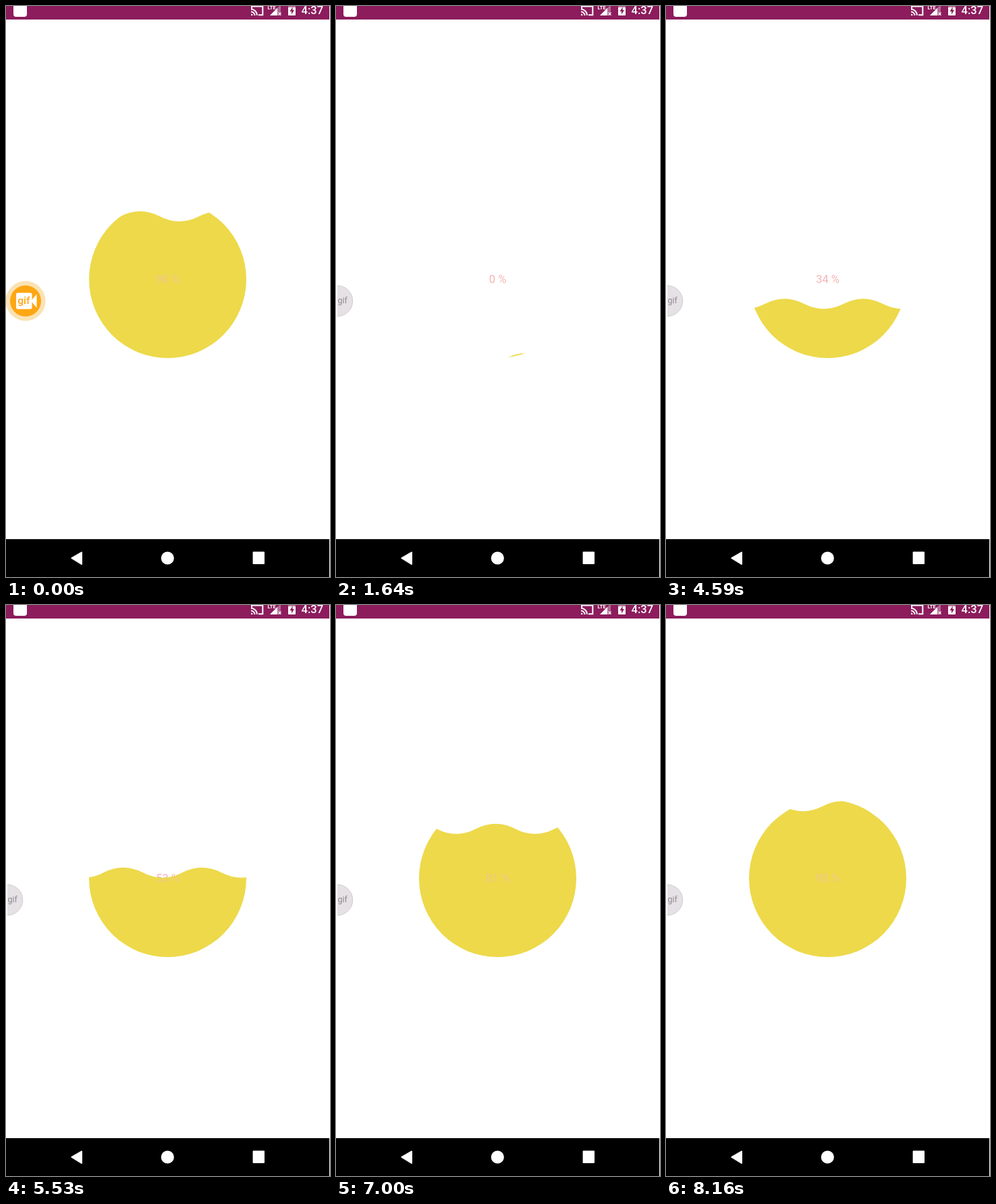
Animation of 480 by 845 pixels, one loop 8.26 s. Source, as an HTML page:

```html
<!DOCTYPE html>
<html lang="en">
<head>
<meta charset="utf-8">
<title>Wave progress</title>
<style>
  html, body { margin: 0; width: 100%; height: 100%; overflow: hidden; background: #fff; }
  svg { display: block; width: 100vw; height: 100vh; }
  text { font-family: Roboto, "Open Sans", sans-serif; }
  .pct { font-size: 16.5px; text-anchor: middle; }
</style>
</head>
<body>
<svg viewBox="0 0 480 845" preserveAspectRatio="none">
  <defs>
    <clipPath id="disk"><circle cx="239.5" cy="404.5" r="116.5"/></clipPath>
    <clipPath id="water"><path class="wave"/></clipPath>
    <clipPath id="edge"><rect x="2" y="400" width="60" height="80"/></clipPath>
  </defs>
  <rect width="480" height="845" fill="#fff"/>

  <!-- status bar -->
  <rect width="479" height="20" fill="#8c1c5c"/>
  <rect x="11" y="-6" width="20" height="22" rx="4" fill="#fff"/>
  <g fill="none" stroke="#fff" stroke-width="2">
    <path d="M364 4V0.5H380.3V13.2H374"/>
    <path d="M363 8.5a5.500 5.500 0 0 1 5.500 5.500M363 4.800a9 9 0 0 1 9 9"/>
  </g>
  <path d="M363 11.400a2.600 2.600 0 0 1 2.600 2.600H363z" fill="#fff"/>
  <path d="M391 14L407 -2V14z" fill="#fff" opacity=".35"/>
  <path d="M391 14L402 3V14z" fill="#fff"/>
  <path d="M403.600 9.600l4 4m0-4l-4 4" stroke="#fff" stroke-width="1.2"/>
  <text x="387.500" y="5" font-size="7.5" font-weight="700" fill="#fff">LTE</text>
  <rect x="418" y="-2" width="11" height="16" rx="1" fill="#fff" opacity=".4"/>
  <rect x="418" y="2" width="11" height="12" rx="1" fill="#fff"/>
  <path d="M424.600 1.500L420.500 8H423V12.500L427 6H424.600z" fill="#8c1c5c"/>
  <text x="437.500" y="12.300" font-size="16.5" font-weight="500" fill="#fff">4:37</text>

  <!-- progress -->
  <text class="pct" x="239.5" y="410" fill="#f5b3b5"></text>
  <g clip-path="url(#disk)"><path class="wave" fill="#edd94a"/></g>
  <g clip-path="url(#water)"><text class="pct" x="239.5" y="410" fill="#f2c68e"></text></g>

  <!-- floating recorder button -->
  <g id="full">
    <circle cx="29" cy="436.5" r="29.5" fill="#fbe2b4"/>
    <circle cx="29" cy="436.5" r="23" fill="#fea613"/>
    <rect x="15" y="424.5" width="23.5" height="24" rx="2.5" fill="#fff"/>
    <path d="M37.500 436.500L45 427.500V445.500z" fill="#fff" stroke="#fff" stroke-linejoin="round"/>
    <text x="17.3" y="441" font-size="15.5" font-weight="500" fill="#fea613">gif</text>
  </g>
  <g id="half" clip-path="url(#edge)">
    <circle id="halo" cx="2" cy="436.5" r="29.5" fill="#fbe2b4"/>
    <circle id="knob" cx="2" cy="436.5" r="22.7"/>
    <text id="tag" x="2.5" y="440" font-size="12.5">gif</text>
  </g>

  <!-- navigation bar -->
  <rect y="789" width="479" height="56" fill="#000"/>
  <g fill="#fff" stroke="#fff" stroke-width="2" stroke-linejoin="round">
    <path d="M97.300 817L112 808.500V826z"/>
    <circle cx="239.3" cy="817" r="8.6"/>
    <rect x="366.6" y="808.6" width="15.4" height="16.4"/>
  </g>
</svg>
<script>
const LOOP = 8260;                  // ms
const FILL = 7600, RESTART = 1555;  // one filling, and when it begins anew
const BOTTOM = 521, SIZE = 233;     // the disk
const WAVE = 116.5, SWELL = 15;     // wave length and curve handle
const CREST = 198.5, DRIFT = 0.1219; // first crest, px per ms
const DOCKING = 90, DOCKED = 150, IDLE = 830;

const all = q => document.querySelectorAll(q);
const byId = id => document.getElementById(id);
const waves = all('.wave'), labels = all('.pct');
const full = byId('full'), half = byId('half'), halo = byId('halo');
const knob = byId('knob'), tag = byId('tag');
const show = (el, on) => { el.style.display = on ? '' : 'none'; };

// share filled, easing in and out
function filled(t) {
  const phase = (t - RESTART + FILL) % FILL / FILL;
  return (1 - Math.cos(Math.PI * phase)) / 2;
}

function wavePath(crest, y) {
  const h = WAVE / 2;
  const x = crest % WAVE - h / 2 - WAVE;
  return `M${x} ${y}` +
    `q${h / 2} ${-SWELL} ${h} 0q${h / 2} ${SWELL} ${h} 0`.repeat(6) +
    `V540H${x}z`;
}

function drawButton(t) {
  const docked = t >= DOCKED, idle = t >= IDLE;
  show(full, !docked);
  show(half, docked);
  show(halo, !idle);
  full.setAttribute('transform', `translate(${t < DOCKING ? 0 : -13})`);
  knob.setAttribute('fill', idle ? '#e5e1e5' : '#fea613');
  knob.setAttribute('stroke', idle ? '#cfcbd1' : 'none');
  tag.setAttribute('fill', idle ? '#8f8c90' : '#fff');
}

function draw(t) {
  const part = filled(t);
  const d = wavePath(CREST + DRIFT * t, BOTTOM - SIZE * part);
  waves.forEach(w => w.setAttribute('d', d));
  labels.forEach(l => { l.textContent = Math.floor(part * 100) + ' %'; });
  drawButton(t);
}

const start = performance.now();
function frame() {
  draw((performance.now() - start) % LOOP);
  requestAnimationFrame(frame);
}
frame();
</script>
</body>
</html>
```
